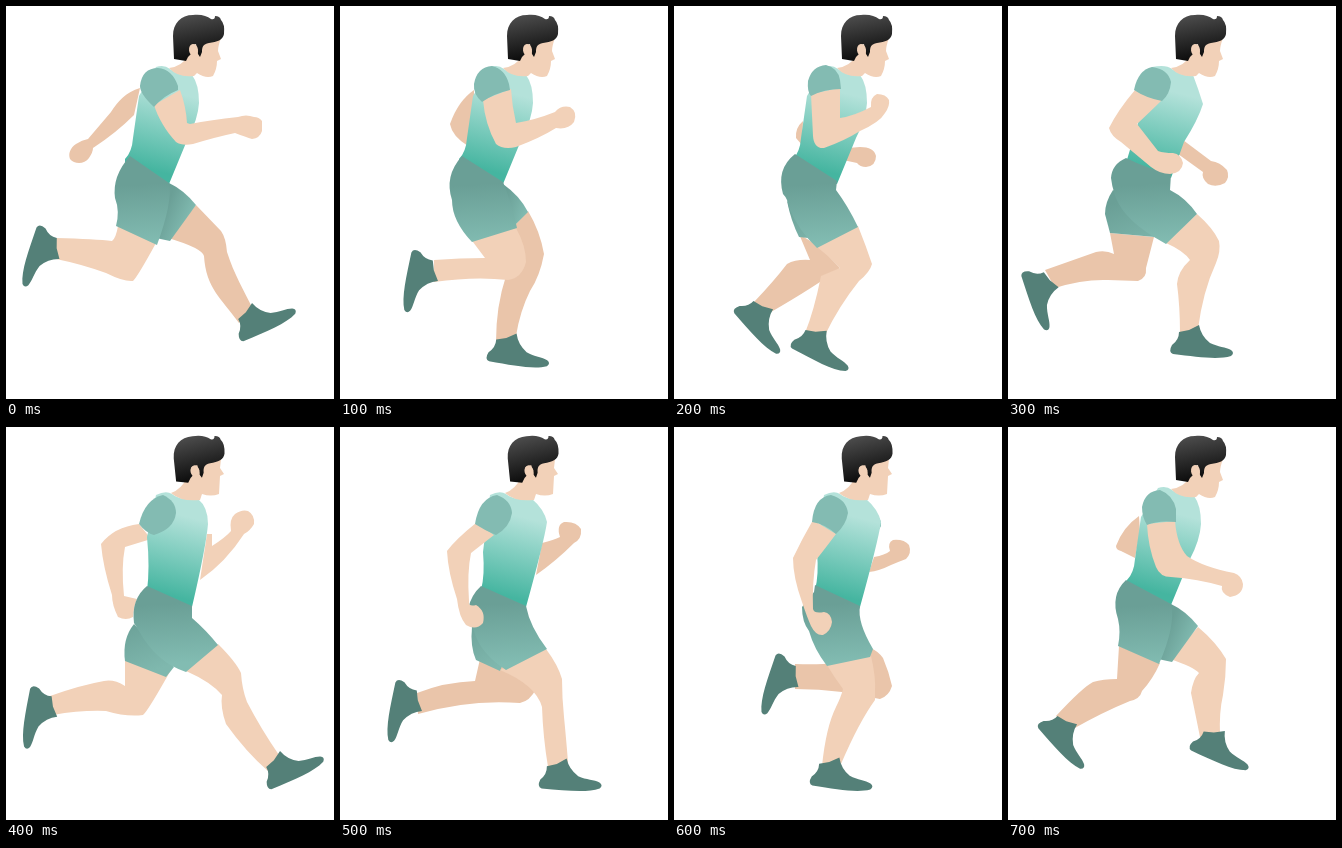
These frames come from a looping animation (328 by 393 pixels, 0.8 s). An HTML page with a canvas:

```html
<!DOCTYPE html>
<html lang="en">
<head>
<meta charset="utf-8">
<title>Runner</title>
<style>
html, body { margin: 0; width: 100%; height: 100%; overflow: hidden; background: #fff; }
canvas { display: block; }
</style>
</head>
<body>
<canvas id="stage" width="328" height="393"></canvas>
<script>
const ctx = document.getElementById('stage').getContext('2d');
const STEP = 100;

function fade(x0, y0, x1, y1, from, to) {
  const g = ctx.createLinearGradient(x0, y0, x1, y1);
  g.addColorStop(0, from);
  g.addColorStop(1, to);
  return g;
}

const fills = {
  skin: '#f2d1b8',
  shade: '#eac5aa',
  shoe: '#548078',
  sleeve: '#83bbb2',
  shirt: fade(174, 88, 154, 166, '#b4e2da', '#45b5a0'),
  shorts: fade(146, 178, 150, 238, '#6a9f96', '#82bcb2'),
  backShorts: fade(125, 190, 145, 245, '#6a9f96', '#7fb8ae'),
  farShorts: fade(160, 200, 186, 212, '#6a9f96', '#82bcb2'),
  hair: fade(186, 10, 194, 52, '#4a4a4a', '#0c0c0c')
};

const SHOE = new Path2D('M-9-4L1-6L11-11Q13 0 22 7C30 11 38 11 43 14Q47 17 43 20C30 24 10 21-15 18Q-20 16-16 9Q-9 4-9-4Z');
const HAIR = new Path2D('M168 53L167 30C167 17 175 9 187 9C195 8 201 10 205 13Q209 14 209 10Q214 10 215 14Q219 18 218 28C217 34 211 36 203 37C197 38 196 41 196 46L194 51L192 48L190 38L184 40L185 48Q182 50 180 55Z');
const FACES = [
  'M190 38L215 32Q212 40 212 45L215 53L211 55Q211 63 207 70Q200 73 191 67L188 70Q172 72 163 62Q177 60 181 50Z',
  'M190 38L215 32L214 41L218 47L214 49L213 67Q205 70 196 67L194 73Q175 75 165 66Q176 62 181 50Z'
].map(d => new Path2D(d));

const TORSO = 'M150 61Q158 58 164 63Q174 71 186 69Q193 78 193 97Q192 113 182 132L163 178L150 177L119 157L119 153Q126 146 127 132L133 90Z';
const UPRIGHT = 'M150 68Q160 63 166 67Q174 74 192 72Q202 80 202 97Q200 120 186 180L184 184L141 164Q144 140 141 110Z';
const OPEN = 'M150 68Q160 63 166 67Q174 74 192 72Q204 82 207 95Q204 115 186 180L184 184L141 163Q145 148 143 125Z';
const FAR_HEM = 'M163 177Q178 184 190 199L164 235L150 232Z';

// Layers run back to front: [fill, path] or ['shoe', x, y, degrees].
const poses = [
  { face: 0, layers: [
    ['shade', 'M134 82C120 86 112 95 105 106L82 133Q76 134 70 138C64 142 62 148 64 153C68 158 78 159 83 152Q87 146 87 142Q110 127 128 109Z'],
    ['shade', 'M190 199L215 225Q220 232 221 246C228 268 238 285 246 301L233 317C215 292 200 282 198 250Q196 242 162 232Z'],
    ['shoe', 242, 312, -30],
    ['farShorts', FAR_HEM],
    ['skin', 'M112 220Q110 232 106 235Q90 233 50 232L50 253Q75 258 100 267Q118 276 127 275Q132 270 150 237Z'],
    ['shoe', 45, 240, 102],
    ['shirt', TORSO],
    ['shorts', 'M124 150L163 177Q167 195 151 239L110 220Q114 205 109 192Q106 170 124 150Z'],
    ['skin', 'M148 99C152 112 160 125 170 136Q176 140 187 138Q210 131 229 127Q240 131 246 133Q254 132 256 125L256 115Q253 111 248 111Q240 108 232 111Q205 114 184 118L181 117Q180 100 174 84Z'],
    ['sleeve', 'M148 101Q134 88 134 80Q136 62 152 62Q166 63 172 80L172 84Q157 90 148 101Z']
  ] },
  { face: 0, layers: [
    ['shade', 'M134 84Q118 95 110 118Q112 130 128 140L134 110Z'],
    ['shade', 'M160 235L188 205Q200 225 204 248Q200 270 190 285Q180 305 176 330L156 336Q156 300 166 270Z'],
    ['shoe', 165, 338, 3],
    ['farShorts', 'M163 178Q180 190 188 206L160 234L150 225Z'],
    ['skin', 'M130 232L176 222Q186 240 186 256Q182 272 168 274Q135 270 94 276L94 254Q120 252 145 252Z'],
    ['shoe', 88, 263, 95],
    ['shirt', TORSO],
    ['shorts', 'M122 150L163 176Q172 198 177 222L132 236Q112 215 112 194Q104 170 122 150Z'],
    ['skin', 'M143 94Q145 118 156 138Q163 144 176 141Q200 132 216 122Q228 124 234 116Q238 106 230 101Q221 99 215 106Q195 114 176 117Q172 100 171 83Z'],
    ['sleeve', 'M142 96Q133 88 134 78Q137 61 152 60Q165 63 169 78L170 84Q153 88 142 96Z']
  ] },
  { face: 0, layers: [
    ['shade', 'M129 115Q121 122 122 132L128 139Z'],
    ['shade', 'M174 142L186 141Q200 141 202 150Q202 160 192 161Q186 161 183 157L169 154Z'],
    ['shade', 'M125 228Q136 235 145 240L166 262Q142 280 97 306L80 296Q100 275 113 258Q122 253 136 254Z'],
    ['shoe', 83.5, 304, 42],
    ['backShorts', 'M113 195Q117 215 125 231L134 232L125 205Z'],
    ['skin', 'M143 240L184 220Q192 240 198 258Q196 266 185 275Q165 300 151 329L131 327Q140 305 147 270L166 262Q155 250 143 241Z'],
    ['shoe', 138.5, 331, 21],
    ['shirt', TORSO],
    ['shorts', 'M121 148L163 175L162 184Q174 200 184 221L143 242Q125 225 115 202Q114 193 109 188Q102 163 121 148Z'],
    ['skin', 'M137 88L139 130Q140 143 150 142Q170 135 186 125Q206 116 211 107Q216 100 215 94Q212 88 203 88Q196 91 197 101Q180 110 166 112L166 82Z'],
    ['sleeve', 'M137 90Q133 86 134 75Q138 60 152 59Q164 62 166 74L167 83Q150 83 137 90Z']
  ] },
  { face: 0, layers: [
    ['shade', 'M175 134L203 155Q212 156 219 164Q222 171 217 177Q208 182 200 178Q193 172 195 166L170 148Z'],
    ['shade', 'M102 227L106 248Q98 244 88 246L37 264L47 282Q75 273 100 274L130 275Q139 272 138 262L146 231Z'],
    ['shoe', 36, 276, 65],
    ['skin', 'M158 237L189 208Q205 222 211 235Q213 245 208 257Q195 285 190 323L172 328Q172 300 169 278Q170 265 182 254Q176 245 158 237Z'],
    ['shoe', 180, 330, 0],
    ['shirt', 'M144 61Q158 58 164 63Q174 71 185 69Q190 82 195 98Q190 114 176 136L163 172L118 157L130 117L140 70Z'],
    ['backShorts', 'M105 184Q97 196 97 208L102 227L147 231L130 195Z'],
    ['shorts', 'M118 152Q104 158 103 172Q104 180 106 186Q112 210 146 231L158 238L189 208Q178 192 162 184L163 168Q140 163 118 152Z'],
    ['skin', 'M127 84Q110 104 101 122Q103 130 113 136L143 161Q152 168 162 168Q174 167 175 157Q173 148 165 147Q156 147 150 145L129 118Q144 104 154 94Z'],
    ['sleeve', 'M126 84Q130 64 144 61Q160 63 163 76Q162 88 154 95Q138 92 126 84Z']
  ] },
  { face: 1, layers: [
    ['skin', 'M201 107L206 107L206 119Q220 110 225 104Q223 92 229 87Q236 82 242 84Q249 88 248 97Q244 104 238 107Q220 135 194 153Z'],
    ['skin', 'M119 233L119 259Q108 252 98 254Q75 258 44 269L47 288Q75 283 100 284Q120 290 137 288Q142 284 166 241Z'],
    ['shoe', 41, 278, 94],
    ['backShorts', 'M128 197Q116 212 119 234L160 250L168 240Z'],
    ['skin', 'M180 244L212 217Q230 235 235 246Q236 262 241 275Q255 302 273 328L262 344Q240 325 220 297Q214 280 216 268Q205 255 180 244Z'],
    ['shoe', 270, 339, -30],
    ['skin', 'M133 97Q108 100 95 117Q97 140 106 168Q106 178 112 190Q120 194 127 190Q128 178 131 172L118 169Q115 140 119 120L145 112Z'],
    ['shirt', UPRIGHT],
    ['shorts', 'M141 159L186 179L186 191Q200 203 212 218L180 245Q150 235 133 204L128 196Q125 172 141 159Z'],
    ['sleeve', 'M133 97Q139 72 157 68Q170 74 170 86Q168 102 148 108Q140 106 133 97Z']
  ] },
  { face: 1, layers: [
    ['shade', 'M202 116Q214 113 220 110Q216 98 224 95Q236 94 241 102Q242 112 234 116Q216 134 196 148Z'],
    ['shade', 'M140 232L185 225Q195 245 196 262Q190 274 180 276Q130 272 78 287L77 266Q105 255 135 254Z'],
    ['shoe', 72, 272, 95],
    ['backShorts', 'M132 200Q130 220 136 233L160 244L166 230Z'],
    ['skin', 'M160 243L206 222Q218 238 222 252Q222 270 224 290Q226 310 228 335L208 340Q203 310 202 280Q196 258 160 243Z'],
    ['shoe', 216, 343, -2],
    ['shirt', OPEN],
    ['shorts', 'M141 159L186 179Q190 200 207 222L166 243Q140 226 134 204Q127 194 128 182Q131 168 141 159Z'],
    ['skin', 'M136 96Q116 112 107 124Q108 145 117 172Q119 190 126 198Q136 204 143 196Q146 184 136 178Q128 180 129 174Q127 145 131 126L154 108Z'],
    ['sleeve', 'M135 97Q139 71 157 68Q171 73 172 86Q170 100 156 108Q144 103 135 97Z']
  ] },
  { face: 1, layers: [
    ['sleeve', 'M203 88Q208 94 207 99L202 108Z'],
    ['shade', 'M200 130Q211 128 216 124Q213 116 219 113Q230 112 235 118Q238 126 232 132Q224 135 217 138Q205 144 195 145Z'],
    ['shade', 'M195 220Q204 224 209 231Q215 245 218 259Q215 269 206 272L168 265Q145 262 121 262L121 237Q145 238 160 236Z'],
    ['shoe', 116, 247, 102],
    ['skin', 'M153 238L197 229Q202 250 201 265L201 273Q185 295 167 337L148 339Q152 300 162 280Q167 270 169 262Q160 250 153 238Z'],
    ['shoe', 154, 341, 2],
    ['shirt', OPEN],
    ['shorts', 'M141 158L186 179Q183 195 199 222L196 230L153 239Q140 222 135 204Q128 195 128 180L140 165Z'],
    ['skin', 'M139 93Q128 112 119 131Q119 150 128 175Q133 190 137 199Q142 209 149 208Q157 204 158 195Q157 186 150 185Q140 187 139 182Q138 155 142 133Q150 123 162 107Z'],
    ['sleeve', 'M138 95Q140 70 157 68Q172 72 174 86Q172 98 162 107Q151 97 138 95Z']
  ] },
  { face: 0, layers: [
    ['shade', 'M131 89Q115 100 108 119Q108 123 113 124L127 131L132 105Z'],
    ['skin', 'M190 200Q208 215 218 232Q218 250 215 268Q211 285 212 309L192 310Q187 285 183 266Q185 252 191 246Q186 240 162 232Z'],
    ['shoe', 203, 311, 18],
    ['farShorts', FAR_HEM],
    ['shade', 'M111 219Q110 235 109 252Q95 252 85 255Q75 260 48 289L65 302Q95 285 122 274Q132 272 134 264Q145 252 152 236Z'],
    ['shoe', 53.5, 298, 42],
    ['shirt', TORSO],
    ['shorts', 'M118 153L163 177Q168 198 151 237L110 219Q113 205 110 192Q102 168 118 153Z'],
    ['skin', 'M139 97Q140 120 148 140Q152 150 163 150Q190 152 214 159Q212 166 222 170Q235 168 235 157Q234 149 226 146Q195 140 179 129Q169 118 167 94Z'],
    ['sleeve', 'M139 98Q134 90 134 80Q137 64 152 63Q165 68 168 82L168 95Q150 93 139 98Z']
  ] }
];

for (const pose of poses) {
  for (const layer of pose.layers) {
    if (layer[0] !== 'shoe') layer[1] = new Path2D(layer[1]);
  }
}

function paint(name, path) {
  ctx.fillStyle = fills[name];
  ctx.fill(path);
}

function drawShoe(x, y, degrees) {
  ctx.save();
  ctx.translate(x, y);
  ctx.rotate(degrees * Math.PI / 180);
  paint('shoe', SHOE);
  ctx.restore();
}

function drawHead(face) {
  paint('skin', FACES[face]);
  ctx.save();
  ctx.translate(192 + face, 35);
  ctx.rotate(-0.06 * face);
  ctx.translate(-192, -35);
  paint('hair', HAIR);
  const ear = new Path2D();
  ear.ellipse(187.5, 44, 4.5, 6, -0.15, 0, Math.PI * 2);
  paint('skin', ear);
  ctx.restore();
}

function draw(now) {
  const pose = poses[Math.floor(now / STEP) % poses.length];
  ctx.fillStyle = '#fff';
  ctx.fillRect(0, 0, 328, 393);
  drawLayers(pose);
  requestAnimationFrame(draw);
}

// The head sits over the shirt and under the near sleeve.
function drawLayers({ face, layers }) {
  layers.forEach(([name, ...args], i) => {
    if (i === layers.length - 1) drawHead(face);
    if (name === 'shoe') drawShoe(...args);
    else paint(name, ...args);
  });
}

requestAnimationFrame(draw);
</script>
</body>
</html>
```
